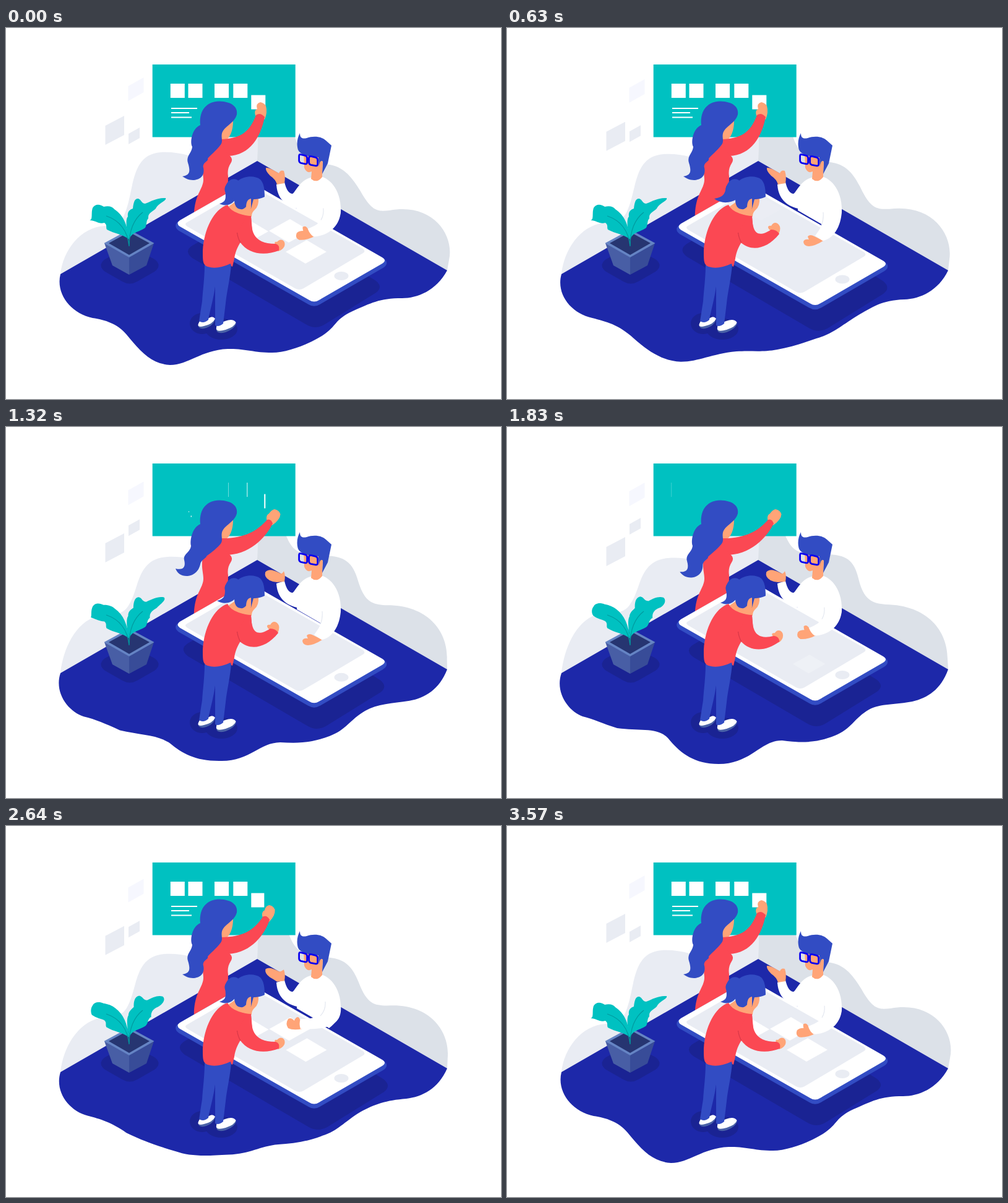
Animation of 800x600 px, one loop 3.6 s. Source, as an HTML page:

```html
<!DOCTYPE html>
<html lang="en">
<head>
<meta charset="utf-8">
<title>Team at work</title>
<style>
  html, body { margin: 0; width: 100%; height: 100%; overflow: hidden; background: #fff; }
  svg { display: block; width: 800px; height: 600px; }
  .blue { fill: #324cc3; } .red { fill: #fb4853; } .skin { fill: #ffa477; }
  .teal { fill: #00c1c1; } .pale { fill: #e9ecf3; } .white { fill: #fff; }
  .shade { fill: #1a2393; } .sole { fill: #4a62a8; }
  .line { fill: none; stroke-width: 1.2; }
</style>
</head>
<body>
<svg viewBox="0 0 800 600">
  <defs>
    <path id="slab" d="M281 311L384 252Q392 248 400 252L608 371Q616 376 608 381L506 440Q498 445 490 440L281 321Q274 316 281 311Z"/>
    <path id="diamond" d="M-33 0L1 -19L33 0L-1 19Z"/>
  </defs>

  <path id="tileA" class="pale" d="M160.500 158L191 142V173L160.500 189Z"/>
  <path id="tileB" fill="#f6f7fe" d="M197.500 94L222.500 80V104L197.500 118Z"/>
  <path id="tileC" class="pale" d="M198 171L216 161V178L198 188Z"/>
  <path id="wallLeft" class="pale"/>
  <path id="wallRight" fill="#dce1e8"/>
  <path id="floor" fill="#1d28a9"/>

  <rect class="teal" x="236.700" y="59" width="231" height="117.500"/>
  <g id="board" class="white"></g>

  <!-- plant -->
  <path class="shade" d="M160 374Q200 350 240 374Q253 384 240 394L212 410Q200 417 188 410L160 394Q147 384 160 374Z"/>
  <path fill="#485ea5" d="M159 348L199 370V399L172 384Z"/>
  <path fill="#384c98" d="M239 348L199 370V399L227 384Z"/>
  <path fill="#6584c4" d="M158.500 348L199 326L239.500 348L199 371Z"/>
  <path fill="#263571" d="M166 348L199 330L232 348L199 367Z"/>
  <path id="leafLeft" class="teal"/>
  <path id="leafRight" class="teal"/>
  <path class="line" stroke="#009a9f" d="M199 353Q195 315 162 304M199 353Q199 315 221 298"/>

  <!-- woman at the board -->
  <path class="skin" d="M367 150C367 166 362 176 357 180L346 182L348 164Z"/>
  <path class="red" d="M348 180L361 206Q368 212 363 219Q357 228 359 240L358 290L304 312C302 270 319 262 319 245C319 235 315 228 318 210C325 195 335 185 348 180Z"/>
  <path id="womanHand" class="skin"/>
  <path id="womanArm" class="red"/>
  <path id="womanHair" class="blue"/>

  <!-- phone -->
  <g id="shadow"><path class="shade" d="M301 352L398 296Q408 291 418 296L598 409Q610 419 598 428L514 480Q500 488 486 480L301 372Q287 361 301 352Z"/></g>
  <g id="phone">
    <use href="#slab" y="4" class="blue" stroke="#324cc3" stroke-width="6.500"/>
    <use href="#slab" class="white"/>
    <path class="pale" d="M293 314L390 258Q396 255 402 258L577 357Q582 361 577 364L481 421Q474 425 467 421L293 321Q287 317 293 314Z"/>
    <ellipse class="pale" cx="542" cy="401" rx="11.500" ry="7"/>
  </g>
  <g id="cards" class="white"></g>

  <!-- man in the phone -->
  <path class="white" d="M492 242C475 246 466 268 463 268C456 268 452 258 450 249L437 253C438 270 446 286 470 292L470 295L508 317L522 327Q538 315 541 297C542 270 530 248 512 241Z"/>
  <path id="manHand" class="skin"/>
  <path id="manArm" class="white"/>
  <path id="manFold" class="line" stroke="#e4e8f0"/>
  <path id="manPalm" class="skin"/>
  <path class="skin" d="M481 200L482 226Q486 236 494 232L493 244Q502 252 511 241L512 205Z"/>
  <path class="blue" d="M475 170C475 177 478 180 486 178C496 174 510 175 517 182L526 190L520 219L511 236Q512 222 512 216Q507 212 506 226L505 209C490 208 476 206 472 197C469 187 471 177 475 170Z"/>
  <path class="skin" d="M506 229Q506 214 511 215Q513 221 510 230Z"/>
  <path fill="none" stroke="#0a00ef" stroke-width="2.800" d="M476 205L484 207Q487 208 487 211V218Q487 221 484 220.500L477 219Q474 218 474 215V208Q474 205 476 205ZM493 208L501 210Q504 211 504 214V221Q504 224 501 223.500L493 222Q490 221 490 218V211Q490 208 493 208ZM487 212L490 213" transform="translate(-.4 -.7)"/>

  <!-- girl in front -->
  <ellipse class="shade" cx="317" cy="478" rx="20" ry="17"/>
  <ellipse class="shade" cx="348" cy="487" rx="26" ry="17"/>
  <path class="sole" d="M311 480Q313 485 338 470Q336 482 320 486Q310 487 311 480Z"/>
  <path class="white" d="M314 472L328 469Q334 465 338 470Q334 479 320 482Q308 485 311 478Z"/>
  <path class="sole" d="M340 487Q352 490 372 476Q372 485 355 492Q340 496 340 487Z"/>
  <path class="white" d="M341 479L354 474Q367 469 371.500 476Q370 483 355 488Q338 493 340 484Z"/>
  <path class="blue" d="M321 383L364 381C363 402 357 425 355 445L351 478Q344 484 338 481L338 418C335 440 330 455 327 472Q319 479 312 474L317 442C318 425 321 405 321 383Z"/>
  <path class="skin" d="M408 274Q409 288 402 294Q397 298 397 305Q375 309 358 290L372 280Z"/>
  <path id="girlTail" class="blue"/>
  <path class="red" d="M358 286Q362 295 376 300Q388 304 396 304L398 328L378 348C372 358 370 366 369 373L366 386L364 385L363 381Q341 391 326 386C318 383 318 377 318 360C320 325 336 293 358 286Z"/>
  <path id="girlHand" class="skin"/>
  <path id="girlArm" class="red"/>
  <path class="line" stroke="#d63848" d="M373.500 331Q375 341 379 347"/>
  <path class="blue" d="M375 247C385 239 402 238 411 245C417 251 418 262 418 273Q410 277 400 277L396 292L388 289Q384 294 379 293Q369 292 369 277C357 272 350 264 355 255C360 243 370 242 376 247Z"/>
  <path class="skin" d="M388 290Q388 277 396 276L396 291Q392 297 388 294Z"/>
</svg>
<script>
const LOOP = 3600;
const el = id => document.getElementById(id);
const ease = u => (1 - Math.cos(Math.PI * Math.min(1, Math.max(0, u)))) / 2;

// Eased value between [time, value] keys.
function track(t, ...keys) {
  let value = keys[0][1];
  for (let i = 1; i < keys.length; i++) {
    const [t0, v0] = keys[i - 1], [t1, v1] = keys[i];
    value += (v1 - v0) * ease((t - t0) / (t1 - t0));
  }
  return value;
}

// Blends neighbouring poses; all poses of a part share the same commands.
function pose(list, v) {
  const i = Math.min(Math.floor(v), list.length - 2);
  const next = list[i + 1].match(/[\d.]+/g);
  let n = 0;
  return list[i].replace(/[\d.]+/g, x => (+x + (next[n++] - x) * (v - i)).toFixed(2));
}

const poses = {
  wallLeft: [
    "M88 398C92 360 120 322 160 320C175 318 185 318 192 300C208 262 200 205 250 201C265 200 280 202 295 206L320 177L407 177L406 215Z",
    "M88 398C92 360 110 315 145 303C160 298 187 308 200 285C217 262 213 216 260 212C275 211 285 212 295 214L320 177L407 177L406 215Z"],
  wallRight: [
    "M406 215L407 176L467 176C470 190 485 219 515 220C545 222 558 240 573 264C593 300 603 296 620 295C690 282 725 335 716 375L713 392Z",
    "M406 215L407 176L450 176C460 198 468 208 515 206C548 206 561 215 568 245C576 278 588 285 612 287C680 288 712 330 712 375L713 392Z"],
  floor: [
    "M88 398L406 215L713 392C695 425 665 437 640 437C603 437 590 445 560 458C530 472 535 482 512 497C490 511 455 525 430 525C400 525 385 518 358 519C315 521 295 545 265 545C235 543 218 524 195 496C180 478 160 472 140 469C105 462 80 430 88 398Z",
    "M88 398L406 215L713 392C697 425 668 438 642 439C605 440 590 452 565 466C535 485 525 495 500 502C480 509 460 516 437 520C410 525 395 521 371 523C330 527 310 540 281 540C250 539 225 520 205 502C180 479 160 475 138 469C103 461 79 430 88 398Z",
    "M88 398L406 215L713 392C701 425 680 438 655 444C630 449 603 447 585 457C562 470 556 489 530 499C495 513 470 510 445 507C410 506 395 545 342 545C300 545 278 525 260 503C243 485 215 492 178 487C155 480 140 472 122 468C100 460 77 430 88 398Z"],
  leafLeft: [
    "M135 311C141 310 137 300 140 291C145 283 153 286 158 289C166 287 172 289 175 293C190 303 196 318 199 342C188 333 176 333 163 326C161 322 164 319 159 315C150 318 145 311 135 311Z",
    "M140 304C136 300 136 294 140 290C143 284 152 284 157 286C165 288 172 291 177 295C190 305 196 320 199 342C188 333 174 333 162 325C160 321 163 318 159 314C153 309 147 311 140 304Z"],
  leafRight: [
    "M199 342C194 324 193 309 197 305C196 298 199 294 205 292C206 282 208 275 214 276C219 278 219 284 225 284C235 280 245 274 258 275C260 280 247 282 242 292C236 298 229 299 230 308C226 312 228 318 225 323C216 330 204 329 199 342Z",
    "M199 342C196 326 195 312 198 307C199 300 203 298 207 293C206 283 209 275 216 274C222 275 222 281 229 281C238 276 246 273 252 276C258 280 256 290 246 293C239 295 235 301 236 309C229 312 231 319 226 323C216 330 204 329 199 342Z"],
  womanHand: [
    "M404 143C401 138 402 132 406 131Q403 122 411 120Q417 121 420 126Q423 136 418 148Z",
    "M422 152C420 147 421 142 425 140Q429 134 434 133Q441 134 443.500 141Q443 150 430 159Z"],
  womanArm: [
    "M346 180C378 179 393 170 404 141Q411 136 418 144C412 175 395 206 359 207Z",
    "M346 180C385 181 406 168 422 150Q428 148 431 156C423 173 400 204 359 207Z"],
  womanHair: [
    "M345 118.500C365 119 375 128 373 140C370 152 356 158 351 166C345 175 353 183 346 190C340 198 330 206 326 211C328 216 317 217 319 226C322 240 312 246 302 246C295 246 290 243 285 240C298 238 298 231 294 218C291 206 300 203 301 192C297 185 300 163 314 157C312 138 320 119 345 118.500Z",
    "M345 118.500C365 119 375 128 373 140C370 152 356 158 351 166C345 175 353 183 346 190C338 199 330 204 324 209C324 212 315 215 314 222C311 236 300 241 292 241C283 241 277 237 274 229C286 232 291 227 288 215C286 205 298 203 299 192C297 185 300 163 314 157C312 138 320 119 345 118.500Z"],
  manPalm: [
    "M420 226Q425 225 441 235Q443 229 449 231Q452 240 450 251L438 253Q436 245 427 239Q419 231 420 226Z",
    "M419 235Q425 227 442 236Q446 239 449 233Q452 240 450 250L438 251Q432 251 426 248Q417 243 419 235Z"],
  manHand: [
    "M479 328L475 313Q473 307 469 310Q466 313 466 315Q461 309 456 312Q451 320 456 327Q464 331 479 328Z",
    "M499 336L488 325Q484 317 479 321Q479 326 480 327Q472 327 469 331Q466 339 473 342Q485 343 499 336Z",
    "M511 344L497 337Q490 333 486 337Q487 341 488 342Q480 341 479 346Q480 353 488 353Q499 352 511 344Z"],
  manArm: [
    "M541 290C544 322 520 330 476 328Q473 320 476 312C500 313 516 305 516 284Z",
    "M541 290C543 315 525 336 496 337Q490 333 487 324C507 317 513 310 513 290Z",
    "M541 290C542 313 532 340 510 344Q504 340 498 336C507 324 513 315 511 297Z"],
  manFold: ["M516 284Q517 298 508 307", "M513 291Q514 302 509 310", "M511 298Q512 310 508 319"],
  girlTail: [
    "M355 255C352 268 361 280 345 284C352 288 364 288 371 277L372 252Z",
    "M355 255C352 262 355 273 335 276C345 284 360 284 371 277L372 252Z"],
  girlHand: [
    "M436 350C433 348 434 345 438 346Q442 341 447 343Q452 346 450 353Q447 359 440 361Z",
    "M426 328C420 323 421 319 427 320Q431 313 437 316Q443 320 441 328Q440 333 437 336Z"],
  girlArm: [
    "M374 330L390 304L396 305C397 325 396 349 436 349Q443 351 441 360C417 369 392 366 378 346Z",
    "M374 330L390 304L396 305C397 325 401 343 427 326Q436 326 440 333C420 358 395 362 378 347Z"]
};

// Board items: x, y, width, height, time of leaving, time of return, return length.
const boardItems = [
  [265.800, 90, 23, 23, 790, 1800, 480], [294.500, 90, 23, 23, 810, 1848, 480],
  [337, 90, 23, 23, 865, 1889, 480], [367.300, 90, 23, 23, 885, 1975, 480],
  [396.300, 108.500, 23, 23, 917, 2138, 620],
  [267, 129, 42, 2, 800, 1879, 480], [267, 136, 29, 2, 870, 1944, 480],
  [267, 143.500, 33, 2, 885, 2215, 420]
];
// Phone cards: x, y, leave start, leave end, return start, return end.
const phoneCards = [
  [391, 329, 60, 500, 1900, 2540], [458, 328, 180, 720, 1880, 2450], [485, 362, 30, 460, 1920, 2580]
];

function add(parent, name) {
  return el(parent).appendChild(document.createElementNS("http://www.w3.org/2000/svg", name));
}
const boardRects = boardItems.map(() => add("board", "rect"));
const cardUses = phoneCards.map(() => {
  const use = add("cards", "use");
  use.setAttribute("href", "#diamond");
  return use;
});
const move = (id, x, y) => el(id).setAttribute("transform", `translate(${x} ${y})`);

function draw(t) {
  const drift = (1 - Math.cos(2 * Math.PI * t / LOOP)) / 2;
  const bob = (1 - Math.cos(4 * Math.PI * t / LOOP)) / 2;
  const gesture = track(t, [700, 0], [1220, 1], [2300, 1], [3110, 0]);
  const reach = track(t, [50, 0], [560, 1], [1450, 1], [2200, 0]);
  const hold = track(t < 1000 ? t + LOOP : t, [1500, 2], [2200, 0], [3060, 0], [4100, 2]);
  const curl = track(t, [600, 0], [2200, 1], [3600, 0]);
  const amounts = {
    wallLeft: drift, wallRight: drift, leafLeft: curl, leafRight: curl,
    floor: drift < .27 ? drift / .27 : 1 + (drift - .27) / .73,
    womanHand: gesture, womanArm: gesture, manPalm: gesture,
    womanHair: track(t, [700, 0], [1260, 1], [1400, 1], [2280, 0]),
    manHand: hold, manArm: hold, manFold: hold,
    girlTail: track(t, [50, 0], [580, 1], [680, 1], [1800, 0]),
    girlHand: reach, girlArm: reach
  };
  for (const id in amounts) el(id).setAttribute("d", pose(poses[id], amounts[id]));

  move("tileA", 0, 36 * drift);
  move("tileB", 0, 10 * drift);
  move("tileC", 0, -14 * drift);
  move("phone", 0, 7 * bob);
  el("shadow").setAttribute("transform", `translate(449 400) scale(${1 + .085 * bob}) translate(-449 -400)`);

  boardItems.forEach(([x, y, w, h, leave, back, length], i) => {
    const out = ease((t - leave) / 500);
    const shown = t < 1600 ? 1 - out : ease((t - back) / length);
    const rect = boardRects[i];
    rect.setAttribute("x", t < 1600 ? x + w * out : x);
    rect.setAttribute("y", y);
    rect.setAttribute("width", w * shown);
    rect.setAttribute("height", h);
  });

  phoneCards.forEach(([x, y, leave, gone, back, full], i) => {
    const out = ease((t - leave) / (gone - leave)), into = ease((t - back) / (full - back));
    const leaving = t < 1500, rest = 1 - ease((t - 2100) / 600);
    let dx = leaving ? -50 * out : 19 * rest;
    let dy = leaving ? -38 * out : 12 * rest;
    let alpha = leaving ? 1 - out : into, size = 1;
    if (i === 2 && !leaving) {
      const rise = ease((t - 1750) / 470);
      dx -= 17 * (1 - rise);
      dy += 10 * (1 - rise);
      size = .78 + .22 * rise;
      alpha = Math.max(alpha, .25 * ease((t - 1700) / 150));
    }
    cardUses[i].setAttribute("transform", `translate(${x + dx} ${y + dy}) scale(${size})`);
    cardUses[i].setAttribute("opacity", alpha);
  });
}

function frame() {
  draw(performance.now() % LOOP);
  requestAnimationFrame(frame);
}
frame();
</script>
</body>
</html>
```
